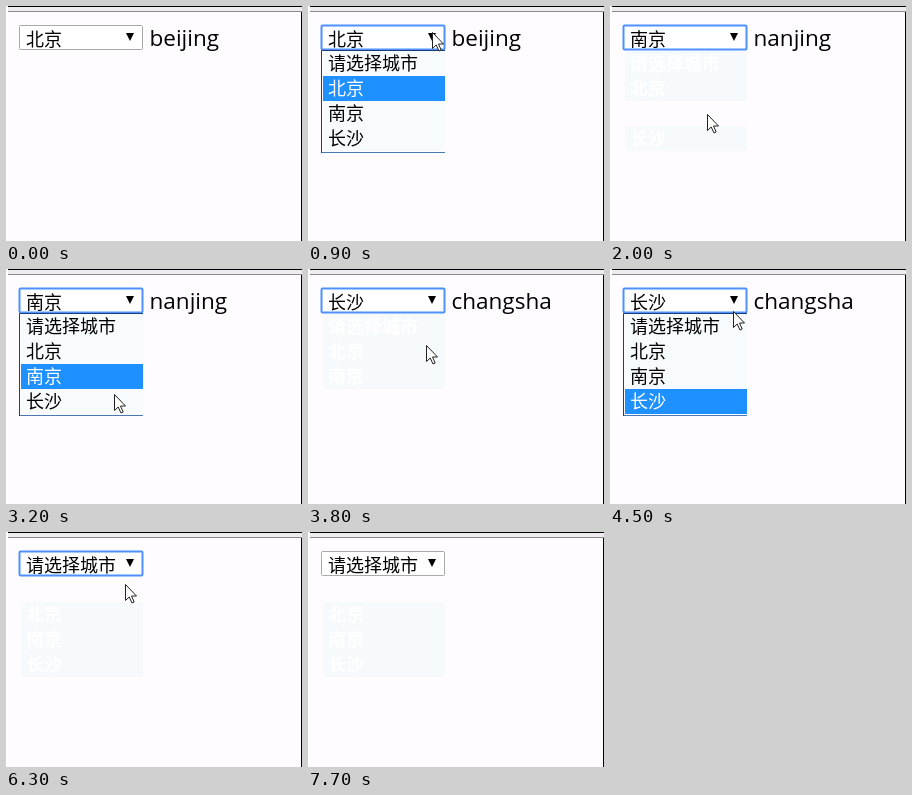
These frames come from a looping animation (296x235 px, 7.8 s). An HTML page:

```html
<!DOCTYPE html>
<html lang="zh-CN">
<head>
<meta charset="utf-8">
<title>City select</title>
<style>
  html, body { margin: 0; height: 100%; overflow: hidden; background: #fffcff; }
  svg { display: block; width: 296px; height: 235px; }
  .zh { font: 300 18px "Noto Sans CJK SC", "Noto Sans CJK", sans-serif; }
  .pinyin { font: 22.5px "Open Sans", "Noto Sans", sans-serif; }
  #box { fill: #fff; stroke: #a9a9a9; }
  #box.focus { stroke: #4d90fe; stroke-width: 2; }
  .row rect { fill: #f8fbfd; }
  .row.active rect { fill: #1e90ff; }
  .row.active text { fill: #fff; }
  .faded .row rect { fill: #f7fafc; }
  .faded .row text { fill: #fff; font-weight: bold; }
  .faded .frame, .faded .row.active { display: none; }
</style>
</head>
<body>
<svg viewBox="0 0 296 235">
  <rect width="296" height="235" fill="#fffcff"/>
  <rect width="2" height="235" fill="#fff"/>
  <rect x="2" y="1" width="294" height="4" fill="#eeecee"/>
  <path d="M2 .5H296" stroke="#000"/>
  <path d="M2 5.5H296" stroke="#8c8a8c"/>
  <path d="M295.5 6V235" stroke="#000"/>

  <rect id="box" x="13.5" y="19.5" width="123" height="24" rx="1"/>
  <text id="chosen" class="zh" x="20" y="40"></text>
  <path d="M120 27h8l-4 8z"/>
  <text id="output" class="pinyin" x="143.5" y="40"></text>

  <g id="list">
    <g class="frame" fill="none">
      <path d="M13.5 147V44.5H137" stroke="#1c3f7c"/>
      <path d="M14 146.5H137" stroke="#4a7ab5"/>
    </g>
  </g>
  <path id="cursor" d="M.5 .5V16.5L4.200 13 7 19 9.200 18 6.500 12H11.500Z"
        fill="#fff" stroke="#222"/>
</svg>
<script>
const LOOP = 7800, STEP = 100;
const LIST_TOP = 45, ROW = 25;
const CLICK_DELAY = 200, HOVER_LAG = 100;

const cities = [
  ["请选择城市", ""], ["北京", "beijing"], ["南京", "nanjing"], ["长沙", "changsha"]
];

// Pointer moves; every arrival but the last is followed by a click.
const entry = { x: 284, y: 72 };
const moves = [
  { start: 100, end: 700, x: 124, y: 26 },
  { start: 950, end: 1800, x: 97, y: 108 },
  { start: 2200, end: 2600, x: 122, y: 28 },
  { start: 2800, end: 3400, x: 107, y: 132 },
  { start: 3700, end: 4100, x: 128, y: 22 },
  { start: 4420, end: 4900, x: 113, y: 77 },
  { start: 5300, end: 5500, x: 127, y: 29 },
  { start: 5700, end: 6100, x: 119, y: 52 },
  { start: 6500, end: 6900, x: 257, y: 126 }
];
const clicks = moves.slice(0, -1).map(m => m.end + CLICK_DELAY);
const enterTime = moves[0].start, leaveTime = moves.at(-1).end;
const blurTime = LOOP - STEP;

const el = id => document.getElementById(id);
const box = el("box"), chosen = el("chosen"), output = el("output");
const list = el("list"), cursor = el("cursor");

list.insertAdjacentHTML("beforeend", cities.map(([name], i) => {
  const y = LIST_TOP + ROW * i;
  return `<g class="row">
    <rect x="15" y="${y}" width="122" height="${ROW}"/>
    <text class="zh" x="20" y="${y + 19}">${name}</text>
  </g>`;
}).join(""));
const rows = [...list.querySelectorAll(".row")];

const easeOut = p => 1 - (1 - p) ** 2.5;

function pointerAt(t) {
  const i = Math.max(0, moves.findLastIndex(m => m.start <= t));
  const from = moves[i - 1] || entry, to = moves[i];
  const p = Math.min(1, Math.max(0, (t - to.start) / (to.end - to.start)));
  const mix = axis => Math.round(from[axis] + (to[axis] - from[axis]) * easeOut(p));
  return { x: mix("x"), y: mix("y") };
}

const rowAt = t => Math.floor((pointerAt(t).y - LIST_TOP) / ROW);

function draw(t) {
  // clicks alternate between opening the list and choosing a row
  const count = clicks.filter(c => c <= t).length;
  const open = count % 2 === 1;
  const city = count < 2 ? 1 : rowAt(clicks[count - 1 - count % 2]);
  const hovered = rowAt(t - HOVER_LAG);
  const marked = open && hovered >= 0 ? hovered : city;

  [chosen.textContent, output.textContent] = cities[city];
  box.classList.toggle("focus", count > 0 && t < blurTime);

  // once used, the closed list leaves a pale afterimage
  list.style.display = count ? "" : "none";
  list.classList.toggle("faded", !open);
  rows.forEach((row, i) => row.classList.toggle("active", i === marked));

  const { x, y } = pointerAt(t);
  cursor.style.display = t >= enterTime && t < leaveTime ? "" : "none";
  cursor.setAttribute("transform", `translate(${x} ${y})`);
}

const origin = performance.now();
function tick() {
  const t = (performance.now() - origin) % LOOP;
  draw(Math.floor(t / STEP) * STEP);
  requestAnimationFrame(tick);
}
tick();
</script>
</body>
</html>
```
